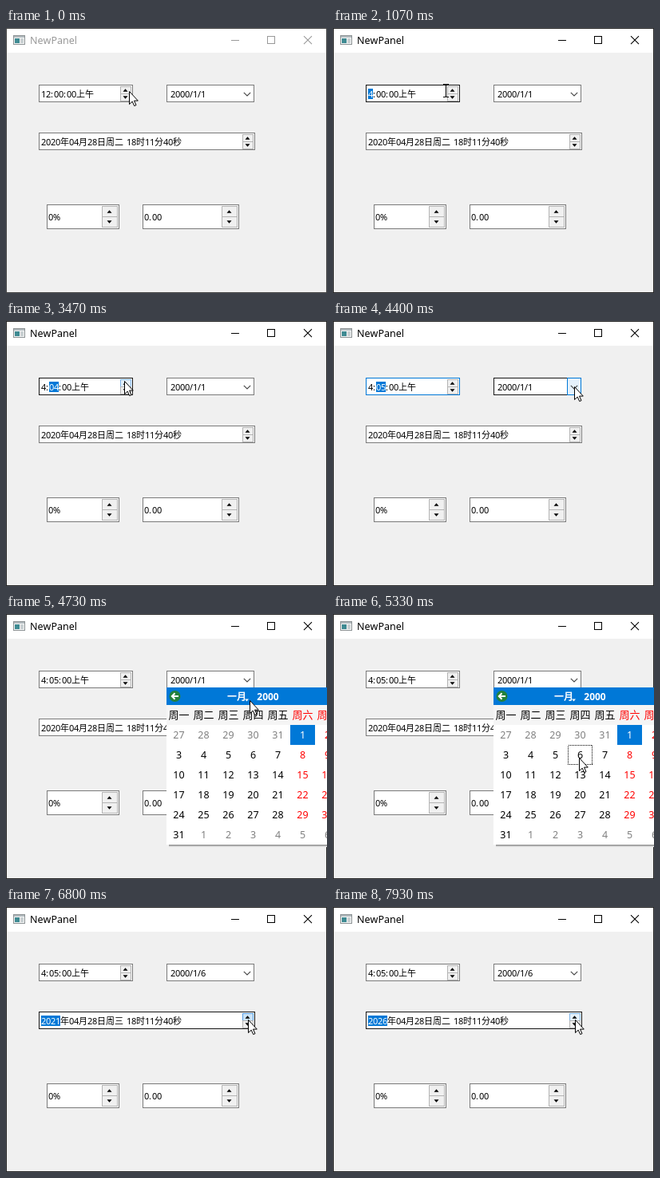
Recreate the animation shown at these times as an HTML page. Size 402 by 332 pixels, loop 8 s.

```html
<!DOCTYPE html>
<html lang="zh-CN">
<head>
<meta charset="utf-8">
<title>Input fields</title>
<style>
html, body { margin: 0; width: 100%; height: 100%; overflow: hidden; }
svg { display: block; width: 402px; height: 332px; cursor: default; }
rect { shape-rendering: crispEdges; }
text { font-family: "Noto Sans", "Noto Sans CJK SC", "Noto Sans CJK", sans-serif; font-kerning: none; white-space: pre; }
.mid { text-anchor: middle; }
</style>
</head>
<body>
<svg id="stage" viewBox="0 0 402 332"></svg>
<script>
const LOOP = 8000, FPS = 15;
const BLUE = '#0078d7', GRAY = '#7a7a7a';
const stage = document.getElementById('stage');

const FIELDS = {
  time: { x: 41, y: 71, w: 118, h: 22 },
  date: { x: 201, y: 71, w: 110, h: 22 },
  stamp: { x: 41, y: 131, w: 271, h: 22 },
  percent: { x: 51, y: 221, w: 91, h: 31 },
  amount: { x: 171, y: 221, w: 121, h: 31 }
};

// Pointer stops: time, x, y
const PATH = [
  [0, 154, 79], [133, 149, 78], [933, 149, 78], [1667, 59, 79], [2000, 59, 79],
  [2200, 129, 81], [2400, 164, 80], [2867, 148, 75], [3733, 148, 75], [4400, 302, 82],
  [4600, 302, 82], [5000, 314, 187], [5200, 308, 180], [5667, 308, 180],
  [5933, 217, 151], [6133, 224, 147], [6533, 303, 141], [8000, 303, 141]
];
const HOUR_CLICKS = [270, 530, 730, 800];
const MINUTE_CLICKS = [2930, 3130, 3270, 3400, 3600];
const YEAR_CLICKS = [6800, 7000, 7200, 7470, 7670, 7870];
const CLICKS = [...HOUR_CLICKS, ...MINUTE_CLICKS, ...YEAR_CLICKS];
const ACTIVE = 270, PICK_MINUTE = 1870, OPEN = 4600, BLUR = 4670, PICK_DAY = 5330, CLOSE = 5470;

const count = (list, t) => list.filter(c => c <= t).length;

function pointerAt(t) {
  const i = Math.max(1, PATH.findIndex(p => p[0] > t));
  const [t0, x0, y0] = PATH[i - 1], [t1, x1, y1] = PATH[i];
  const u = Math.min(1, (t - t0) / (t1 - t0)), k = u * u * (3 - 2 * u);
  return { x: Math.round(x0 + (x1 - x0) * k), y: Math.round(y0 + (y1 - y0) * k) };
}

const fill = (x, y, w, h, color) =>
  `<rect x="${x}" y="${y}" width="${w}" height="${h}" fill="${color}"/>`;
const frame = (x, y, w, h, color, stroke, extra = '') =>
  `<rect x="${x + .5}" y="${y + .5}" width="${w - 1}" height="${h - 1}" fill="${color}" stroke="${stroke}" ${extra}/>`;
const line = (d, color, width = 1) =>
  `<path d="${d}" fill="none" stroke="${color}" stroke-width="${width}"/>`;
const label = (str, x, y, size, color, extra = '') =>
  `<text x="${x}" y="${y}" font-size="${size}" fill="${color}" ${extra}>${str}</text>`;

const advance = c => c > '\u2fff' ? 11 : c === '%' ? 11 : /\d/.test(c) ? 6 : 4;

// Text on the whole-pixel grid of the fields, with an optional selected range
function gridText(str, x, y, from = 0, to = 0) {
  const xs = [x];
  for (const c of str) xs.push(xs[xs.length - 1] + advance(c));
  const part = (a, b, color) => a < b
    ? label(str.slice(a, b), xs.slice(a, b).join(' '), y, 11, color) : '';
  const back = to > from ? fill(xs[from], y - 11, xs[to] - xs[from], 13, BLUE) : '';
  return back + part(0, from, '#000') + part(from, to, '#fff') + part(to, str.length, '#000');
}

const inside = (p, f) => p.x >= f.x && p.x < f.x + f.w && p.y >= f.y && p.y < f.y + f.h;

function buttonColors(hot, pressed) {
  if (!hot) return ['#f0f0f0', '#b4b4b4'];
  return pressed ? ['#cce4f7', '#569de5'] : ['#e5f1fb', '#7eb4ea'];
}

function spinButtons(f, p, pressed) {
  const big = f.h > 22, w = big ? 20 : 14, h = (f.h - 2) >> 1;
  const x = f.x + f.w - w - 2, cx = x + w / 2 - .5;
  return [0, 1].map(i => {
    const y = f.y + 2 + i * (h - 1), cy = y + h / 2, s = i ? -1 : 1;
    const hot = p && inside(p, { x, y, w, h: h - 1 });
    return frame(x, y, w, h, ...buttonColors(hot, pressed)) +
      `<path d="M${cx - 3} ${cy + 1.7 * s}L${cx} ${cy - 1.7 * s}L${cx + 3} ${cy + 1.7 * s}Z"/>`;
  }).join('');
}

function field(name, p, focused) {
  const f = FIELDS[name];
  const border = p && inside(p, f) ? '#171717' : focused ? BLUE : GRAY;
  return frame(f.x, f.y, f.w, f.h, '#fff', border);
}

function titleBar(active) {
  const ink = active ? '#000' : '#999';
  return fill(1, 1, 400, 30, '#fff') +
    frame(9, 9, 15, 12, '#f4f6f6', '#8c9294') + fill(10, 10, 13, 2, '#b3bbbf') +
    fill(11, 13, 6, 6, '#3e8a92') + fill(18, 13, 4, 6, '#c9d0d2') +
    label('NewPanel', 30, 20, 12.5, ink) +
    fill(282, 15, 10, 1, ink) + frame(327, 10, 10, 10, 'none', ink) +
    line('M373 10.2L383 20.2M383 10.2L373 20.2', ink, 1.1);
}

function dateField(p, t) {
  const hot = p && inside(p, { x: 293, y: 71, w: 18, h: 22 });
  return field('date', p, false) +
    (hot ? frame(293, 71, 18, 22, t >= 4530 ? '#cce4f7' : '#e5f1fb', BLUE) : '') +
    gridText('2000/1/' + (t < CLOSE ? 1 : 6), 206, 87) +
    line('M297.8 80.8L302 85L306.2 80.8', '#444', 1.1);
}

function calendar(t) {
  const left = 201, top = 139, cw = 31, ch = 25;
  let out = fill(left + 3, 289, 200, 1, '#8e8e8e') + fill(left + 3, 290, 200, 1, '#bcbcbc') +
    fill(left + 3, 291, 200, 1, '#dedede') +
    fill(left, 92, 201, 22, BLUE) + fill(left, 114, 201, 25, '#f5f5f5') + fill(left, top, 201, 150, '#fff') +
    '<circle cx="211.5" cy="103" r="7" fill="#24813b"/>' +
    line('M216 103H208M211.5 99.3L207.8 103L211.5 106.7', '#fff', 2) +
    label('一月', 289, 108, 12, '#fff', 'class="mid" font-weight="700"') +
    '<path d="M299 106.5h5l-2.5 3z" fill="#fff"/>' +
    label('2000', 328, 108, 12, '#fff', 'class="mid" font-weight="700"');
  [...'一二三四五六日'].forEach((d, c) => {
    out += label('周' + d, left + 15.5 + c * cw, 131, 13, c > 4 ? '#f00' : '#000', 'class="mid"');
  });
  for (let i = 0; i < 42; i++) {
    const c = i % 7, r = Math.floor(i / 7), n = i - 4;
    const x = left + c * cw, y = top + r * ch;
    const current = n >= 1 && n <= 31;
    const day = n < 1 ? n + 31 : n > 31 ? n - 31 : n;
    if (n === 1) out += fill(x, y, cw, ch, BLUE);
    if (n === 6 && t >= PICK_DAY) out += frame(x, y, cw, ch, 'none', '#000', 'stroke-dasharray="1 1"');
    const color = n === 1 ? '#fff' : !current ? '#808080' : c > 4 ? '#f00' : '#000';
    out += label(day, x + 15.5, y + 17, 12.5, color, 'class="mid"');
  }
  return out;
}

function pointer(p, open) {
  const overText = !open && Object.values(FIELDS).some(f =>
    inside(p, { ...f, w: f.w - (f.h > 22 ? 22 : 17) }));
  const shape = overText
    ? line('M-3 -7.5H-.5L.5 -6.5L1.5 -7.5H4M.5 -7V8M-3 8.5H-.5L.5 7.5L1.5 8.5H4', '#000', 1.1)
    : '<path d="M.5 .5V16.6L4.2 13.1L6.7 18.6L9 17.6L6.5 12.1H11.3Z" fill="#fff" stroke="#000"/>';
  return `<g transform="translate(${p.x} ${p.y})">${shape}</g>`;
}

function scene(t) {
  const active = t >= ACTIVE, open = t >= OPEN && t < CLOSE;
  const p = pointerAt(t), hover = t < 60 || open ? null : p;
  const pressed = CLICKS.some(c => t >= c - 5 && t < c + 55);

  const hour = count(HOUR_CLICKS, t + 5) || 12;
  const minute = String(count(MINUTE_CLICKS, t + 5)).padStart(2, '0');
  const timeFocus = active && t < BLUR - 5;
  const hourLen = String(hour).length;
  const range = !timeFocus ? [0, 0] : t < PICK_MINUTE - 5 ? [0, hourLen] : [hourLen + 1, hourLen + 3];

  const steps = count(YEAR_CLICKS, t + 5), year = 2020 + steps;
  const weekday = '日一二三四五六'[new Date(year, 3, 28).getDay()];

  return frame(0, 0, 402, 332, '#f0f0f0', active ? '#262626' : '#434343') + titleBar(active) +
    field('time', hover, timeFocus) + gridText(`${hour}:${minute}:00上午`, 44, 87, ...range) +
    spinButtons(FIELDS.time, hover, pressed) +
    dateField(hover, t) +
    field('stamp', hover, steps > 0) +
    gridText(`${year}年04月28日周${weekday} 18时11分40秒`, 44, 147, 0, steps ? 4 : 0) +
    spinButtons(FIELDS.stamp, hover, pressed) +
    field('percent') + gridText('0%', 53, 241) + spinButtons(FIELDS.percent) +
    field('amount') + gridText('0.00', 173, 241) + spinButtons(FIELDS.amount) +
    (open ? calendar(t) : '') + pointer(p, open);
}

let shown = -1;
function draw(now) {
  const tick = Math.floor((now % LOOP + 4) * FPS / 1000) % (LOOP * FPS / 1000);
  if (tick !== shown) {
    shown = tick;
    stage.innerHTML = scene(Math.round(tick * 100 / FPS) * 10);
  }
}

const start = performance.now();
function loop() {
  draw(performance.now() - start);
  requestAnimationFrame(loop);
}
loop();
</script>
</body>
</html>
```
